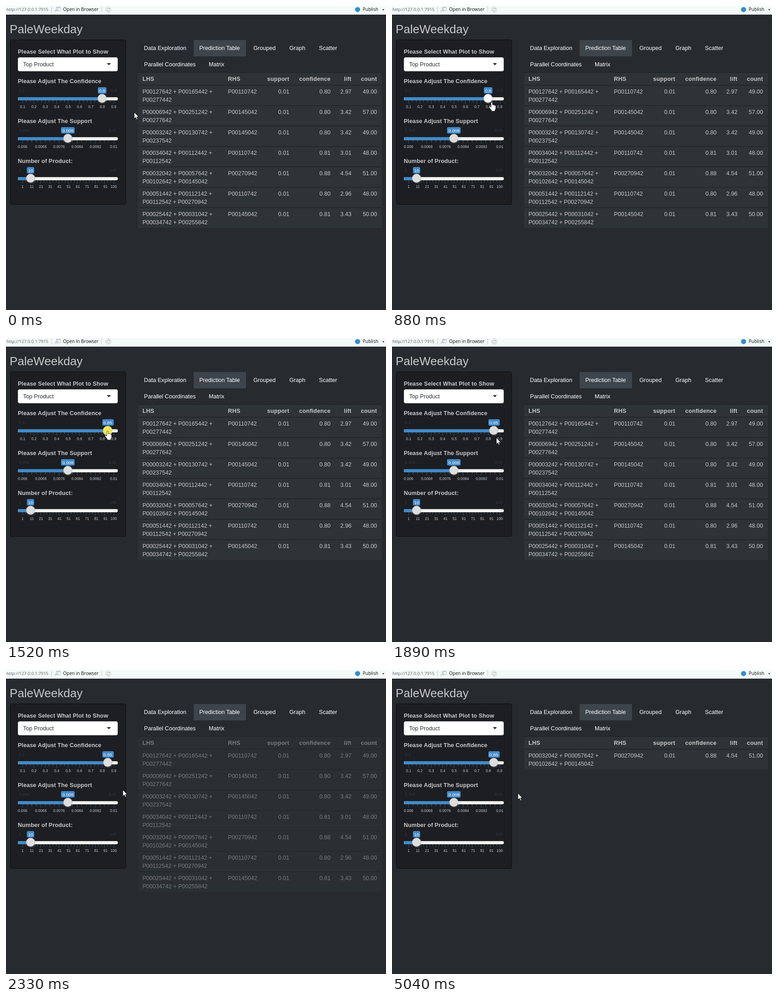
Recreate the animation shown at these times as an HTML page. Size 836 by 670 pixels, loop 6.16 s.

```html
<!DOCTYPE html>
<html lang="en">
<head>
<meta charset="utf-8">
<title>PaleWeekday</title>
<style>
html, body { margin: 0; width: 100%; height: 100%; overflow: hidden; background: #272b30; }
svg { display: block; }
text { font: 12.6px "Liberation Sans", Arial, sans-serif; fill: #c8c8c8; white-space: pre; }
.bar { font: 10px "Open Sans", sans-serif; fill: #111; }
.url { font: 9.5px "Open Sans", sans-serif; fill: #5a5a5a; }
.title { font-size: 26.1px; }
.bold { font-weight: bold; letter-spacing: .14px; }
.head { font-weight: bold; letter-spacing: .25px; }
.tab { fill: #fff; }
.pick { fill: #272b30; }
.tick { font-size: 8.3px; fill: #c8c8c8; text-anchor: middle; }
.dim { font-size: 9px; fill: #36393d; }
.val { font-size: 9.9px; fill: #fff; text-anchor: middle; }
.end { text-anchor: end; }
</style>
</head>
<body>
<svg id="stage" width="836" height="670" viewBox="0 0 836 670">
  <defs>
    <linearGradient id="track" x2="0" y2="1">
      <stop offset="0" stop-color="#e8e8e8"/><stop offset="1" stop-color="#fafafa"/>
    </linearGradient>
  </defs>
</svg>
<script>
const LOOP = 6160;
const stage = document.getElementById("stage");

function add(parent, tag, attrs, content) {
  const node = document.createElementNS("http://www.w3.org/2000/svg", tag);
  for (const key in attrs) node.setAttribute(key, attrs[key]);
  if (content !== undefined) node.textContent = content;
  parent.appendChild(node);
  return node;
}
const rect = (p, x, y, width, height, fill, more) =>
  add(p, "rect", { x, y, width, height, fill, ...more });
const text = (p, x, y, str, cls = "") => add(p, "text", { x, y, class: cls }, str);
const path = (p, d, fill, more) => add(p, "path", { d, fill, ...more });
const show = (node, on) => node.setAttribute("visibility", on ? "visible" : "hidden");

function drawToolbar() {
  rect(stage, 0, 0, 836, 19, "#f4f9f9");
  text(stage, 1, 11, "http://127.0.0.1:7915", "url");
  for (const x of [100, 210]) rect(stage, x, 1, 1, 13, "#c3c8ca");
  path(stage, "M110.5 2.5h9v8h-9z", "#fff", { stroke: "#b4bcc2" });
  path(stage, "M110 3h10v2h-10z", "#c2d2de");
  path(stage, "M107.5 12.5q0-5 5-5v-2l3.5 3.2-3.5 3.2v-2q-3 0-5 2.6z", "#dce6ea", { stroke: "#a4b2ba", "stroke-width": .7 });
  text(stage, 125.5, 11, "Open in Browser", "bar");
  add(stage, "circle", { cx: 225, cy: 8, r: 6, fill: "#fafcfc", stroke: "#c4c8ca" });
  path(stage, "M227.6 6.2a3.2 3.2 0 1 0 .6 2.6", "none", { stroke: "#adb2b5", "stroke-width": 1.2 });
  path(stage, "M228.6 4.2v3.2h-3.2z", "#adb2b5");
  add(stage, "circle", { cx: 773.5, cy: 7.8, r: 5.6, fill: "#2f8fd0" });
  text(stage, 784.8, 11, "Publish", "bar");
  path(stage, "M827.5 7h5l-2.5 3z", "#333");
}

function drawTabs() {
  rect(stage, 413, 75, 115, 36, "#3e444c");
  const tabs = [[303.6, 97, "Data Exploration"], [425.2, 97, "Prediction Table"], [544.3, 97, "Grouped"],
    [623.4, 97, "Graph"], [688.5, 97, "Scatter"], [303.8, 133, "Parallel Coordinates"], [446, 133, "Matrix"]];
  for (const [x, y, name] of tabs) text(stage, x, y, name, "tab");
}

const LEFT = 36.5, SPAN = 200.5;

// One range slider; returns set(ratio, label, hover)
function slider(y, label, min, max, ticks, count, minor) {
  text(stage, 26, y - 34, label, "bold");
  text(stage, 28.7, y - 15, min, "dim");
  const top = text(stage, 243.3, y - 15, max, "dim end");
  rect(stage, 26, y - 3, 220, 7, "url(#track)", { rx: 3 });
  const fill = rect(stage, 26, y - 3, 10, 7, "#428bca", { rx: 3 });
  const gap = SPAN / count;
  const marks = Math.round(count * (minor + 1));
  for (let i = 0; i <= marks; i++) {
    const big = i % (minor + 1) === 0 || i === marks;
    const x = Math.floor(LEFT + SPAN * i / marks);
    rect(stage, x, y + 4, 1, big ? 7 : 4, big ? "#428bca" : "#999", { opacity: .5 });
  }
  ticks.forEach((name, i) => text(stage, LEFT + Math.min(SPAN, gap * i), y + 21, name, "tick"));
  const knob = add(stage, "g", {});
  add(knob, "circle", { cx: .7, cy: .7, r: 11, fill: "#fff", opacity: .12 });
  add(knob, "circle", { r: 9.5, stroke: "#b5b5b5", "stroke-width": .9 });
  const tag = rect(stage, 0, y - 25, 20, 14, "#428bca", { rx: 2.7 });
  const val = text(stage, 0, y - 14, "", "val");
  return (ratio, str, hover) => {
    const x = LEFT - .5 + SPAN * ratio;
    const digits = str.replace(".", "").length;
    const w = 5.4 + 9.9 * (digits * .556 + (digits < str.length ? .278 : 0));
    fill.setAttribute("width", x - 26);
    knob.setAttribute("transform", `translate(${x - .2} ${y - .4})`);
    knob.setAttribute("fill", hover ? "#fff" : "#dedede");
    tag.setAttribute("x", Math.round(x - w / 2));
    tag.setAttribute("width", Math.round(w));
    val.setAttribute("x", x);
    val.textContent = str;
    show(top, x + w / 2 < 230);
  };
}

function drawPanel() {
  text(stage, 8, 60, "PaleWeekday", "title");
  rect(stage, 9.5, 74.5, 254, 363, "#1c1e22", { rx: 3, stroke: "#0c0d0e" });
  text(stage, 26, 105, "Please Select What Plot to Show", "bold");
  rect(stage, 26.5, 113.5, 219, 30, "#fff", { rx: 3.2, stroke: "#ccc" });
  text(stage, 37.8, 133, "Top Product", "pick");
  path(stage, "M221.8 126h9l-4.5 4.6z", "#222");
}

const DATA = [
  ["P00127642 + P00165442 +", "P00277442", "P00110742", "0.80", "2.97", "49.00"],
  ["P00006942 + P00251242 +", "P00277642", "P00145042", "0.80", "3.42", "57.00"],
  ["P00003242 + P00130742 +", "P00237542", "P00145042", "0.80", "3.42", "49.00"],
  ["P00034042 + P00112442 +", "P00112542", "P00110742", "0.81", "3.01", "48.00"],
  ["P00032042 + P00057642 +", "P00102642 + P00145042", "P00270942", "0.88", "4.54", "51.00"],
  ["P00051442 + P00112142 +", "P00112542 + P00270942", "P00110742", "0.80", "2.96", "48.00"],
  ["P00025442 + P00031042 +", "P00034742 + P00255842", "P00145042", "0.81", "3.43", "50.00"]
];

function drawTable(rows) {
  const g = add(stage, "g", {});
  const line = (y, h) => rect(g, 290.5, y, 536.5, h, "#1c1e22");
  const cells = (y, names, cls) => {
    text(g, 300.2, y, names[0], cls);
    text(g, 488.3, y, names[1], cls);
    [623.2, 714, 760, 816.2].forEach((x, i) => text(g, x, y, names[i + 2], cls + " end"));
  };
  rect(g, 290.5, 146, 536.5, 28 + 45 * rows.length, "#2e3338");
  line(146, 1);
  cells(165, ["LHS", "RHS", "support", "confidence", "lift", "count"], "head");
  line(174, 1);
  rows.forEach(([lhs, more, rhs, conf, lift, count], i) => {
    const y = 193 + 45 * i;
    if (i) line(y - 19, 1);
    cells(y, [lhs, rhs, "0.01", conf, lift, count], "");
    text(g, 300.2, y + 18, more);
  });
  return g;
}

drawToolbar();
drawPanel();
const seq = (n, f) => Array.from({ length: n }, (_, i) => f(i));
const setConf = slider(204, "Please Adjust The Confidence", "0.1", "0.9", seq(9, i => ((i + 1) / 10).toFixed(1)), 8, 2);
const setSupp = slider(292, "Please Adjust The Support", "0.006", "0.01",
  seq(6, i => String(+(.006 + .0008 * i).toFixed(4))), 5, 3);
const setNum = slider(380, "Number of Product:", "1", "100", seq(11, i => Math.min(100, 1 + 10 * i)), 9.9, 2);
setSupp(.5, "0.008");
setNum(9 / 99, "10");
drawTabs();
const full = drawTable(DATA);
const short = drawTable([DATA[4]]);

const glow = add(stage, "circle", { r: 10.5, fill: "#ece43c", opacity: .88 });
const ink = { stroke: "#000", "stroke-width": .9, "stroke-linejoin": "round" };
const arrow = path(stage, "M0 0V14.3L3.3 11.3 5.5 16.4 7.8 15.4 5.6 10.5H10z", "#fff", ink);
const hand = path(stage,
  "M-1.6 1.3Q0 -.8 1.5 1.3V6.4Q3.4 5.4 4.2 7Q6 6.2 6.7 7.8Q8.8 7.4 8.8 9.6V14Q8.4 16.5 7 18V20.3H-.6V18.4Q-3 15.5-5.4 12Q-6.2 9.6-3.8 9.8L-1.6 11.8z",
  "#fff", { ...ink, stroke: "#222", "stroke-width": .8 });

// Bursts of motion: start, end, number of held steps
const BURSTS = [[580, 1130, 10], [1200, 1520, 6], [1700, 2260, 10], [2330, 2620, 6], [5040, 5040, 1]];
const MOVE = [[0, 282, 234], [520, 282, 234], [580, 276, 232], [703, 247, 221], [825, 225, 213], [885, 219.5, 211.5],
  [1008, 213.5, 207.5], [1130, 211.5, 205], [1200, 211.5, 205], [1264, 213, 205], [1456, 222.5, 204.7], [1520, 223.5, 204.5],
  [1700, 223.5, 204.5], [1762, 224.5, 207], [1949, 232, 226], [2260, 251.5, 262], [2330, 257, 264],
  [2500, 270.5, 269.5], [2620, 277, 271.5]];
const FADE = [[0, 1], [2200, 1], [2260, .97], [2330, .5], [2390, .37], [2480, .3]];

function hold(t) {
  let last = 0;
  for (const [from, to, n] of BURSTS) {
    if (t < from) break;
    const gap = (to - from) / Math.max(1, n - 1);
    last = from + gap * Math.min(n - 1, gap ? Math.floor((t - from) / gap + .15) : 0);
  }
  return last;
}

function sample(keys, t) {
  const i = keys.findIndex(k => k[0] > t);
  if (i < 0) return keys[keys.length - 1].slice(1);
  const a = keys[i - 1], b = keys[i], u = (t - a[0]) / (b[0] - a[0]);
  return a.slice(1).map((v, j) => v + (b[j + 1] - v) * u);
}

function render(time) {
  const t = hold(time);
  const [x, y] = sample(MOVE, t);
  const down = t >= 1200 && t < 1700;
  const high = t >= 1380;
  const knobX = high ? 224 : 211.5;
  const hover = down || Math.hypot(x - knobX, y - 203.5) < 11.6;
  setConf(high ? .9375 : .875, high ? "0.85" : "0.8", hover);
  for (const node of [arrow, hand, glow]) node.setAttribute("transform", `translate(${x} ${y})`);
  show(arrow, !hover);
  show(hand, hover);
  show(glow, down);
  show(full, t < 5040);
  show(short, t >= 5040);
  full.setAttribute("opacity", sample(FADE, t)[0]);
}

const start = performance.now();
function tick() {
  render((performance.now() - start) % LOOP);
  requestAnimationFrame(tick);
}
tick();
</script>
</body>
</html>
```
